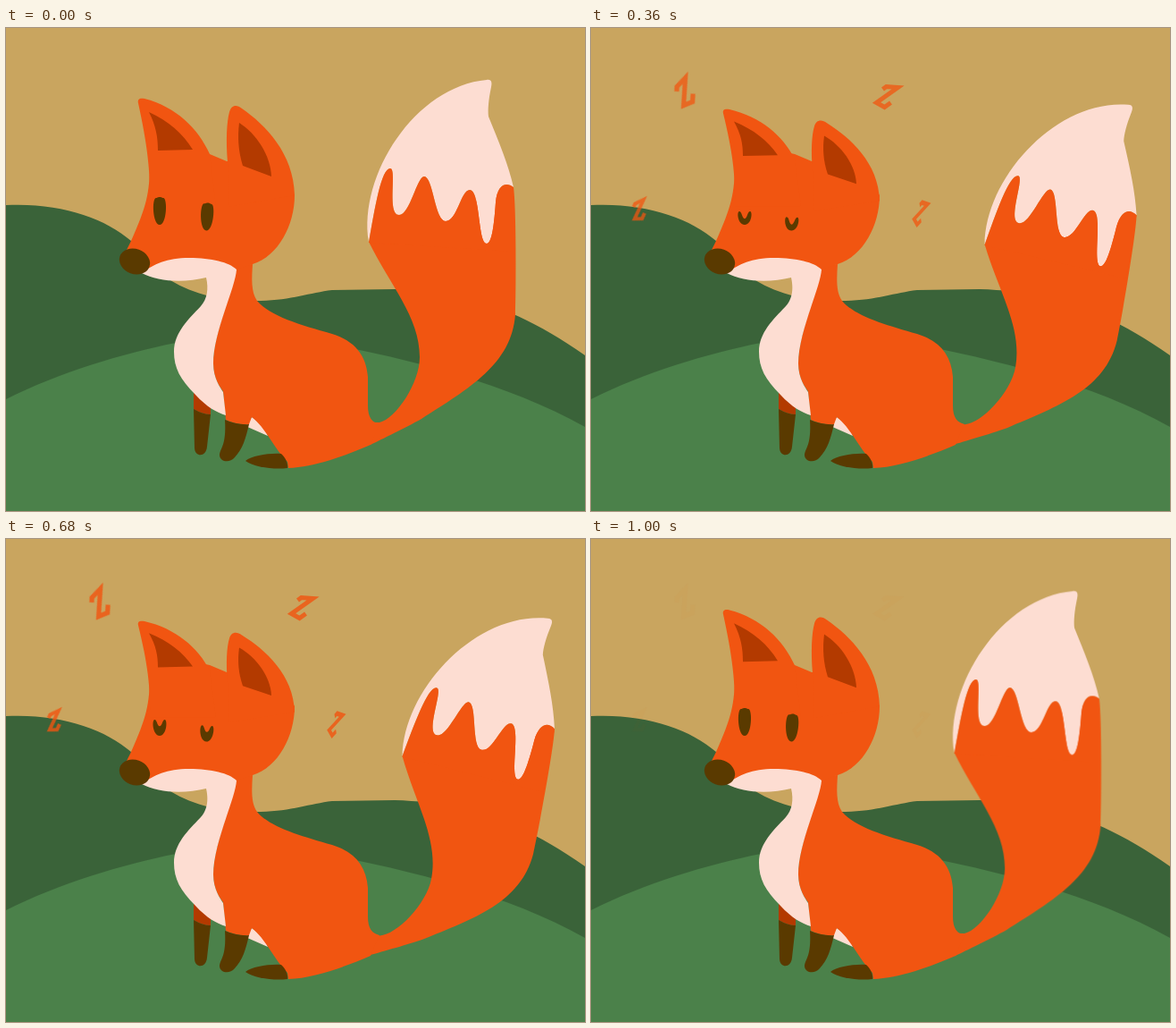
An HTML page for the animation above (1.04 s loop, 648 by 540 pixels).

```html
<!DOCTYPE html>
<html lang="en">
<head>
<meta charset="utf-8">
<title>Sleepy fox</title>
<style>
  html, body { margin: 0; width: 100%; height: 100%; overflow: hidden; background: #c9a55f; }
  svg { display: block; width: 100vw; height: 100vh; }
  .far { fill: #3a6339; }
  .near { fill: #4b814a; }
  .fur { fill: #f15511; }
  .shade { fill: #b33a00; }
  .cream { fill: #fdddd2; }
  .dark { fill: #5a3a00; }
  #zs { fill: none; stroke: #f15511; stroke-width: 5; }
</style>
</head>
<body>
<svg viewBox="0 0 648 540">
  <defs><path id="z" d="M-5 -7L-1 -10L12 -9L-12 8L-3 13L4 8"/></defs>

  <path class="far" d="M0 198C60 195 110 212 140 238C158 268 188 290 228 300C250 304 265 305 285 305C320 304 340 296 365 293L435 292C500 294 565 307 648 366V540H0Z"/>
  <path class="near" d="M0 415C60 385 130 364 190 352C260 338 340 348 405 362C480 378 570 403 648 446V540H0Z"/>

  <g id="zs">
    <use href="#z" transform="translate(105 71.5) rotate(-51) scale(1.05)"/>
    <use href="#z" transform="translate(331.5 75.5)"/>
    <use href="#z" transform="translate(369 206) rotate(10) scale(.5 1.1)"/>
    <use href="#z" transform="translate(54 203) rotate(-30) scale(.8)"/>
  </g>

  <g id="tail">
    <path class="fur" d="M380 440L418 441C436 437 463 397 463 368C463 323 430 288 406 239L568 178C571 200 571 290 570 320C566 376 518 403 465 437C447 447 420 460 408 466L380 460Z"/>
    <path class="cream" d="M406 239C394 165 458 65 538 58C544 57 544 62 543 66C540 80 539 92 540 99C552 128 562 152 568 178C560 172 550 174 548 195C546 225 543 241 538 241C528 241 531 181 519 181C509 181 505 216 492 216C480 216 478 166 468 166C460 166 452 209 440 209C426 209 438 157 430 157C420 157 413 200 406 239Z"/>
    <path class="fur" d="M406 240C413 200 420 157 430 157C438 157 426 209 440 209C452 209 460 166 468 166C478 166 480 216 492 216C505 216 509 181 519 181C531 181 528 241 538 241C543 241 546 225 548 195C550 174 560 172 568 178V250Z"/>
  </g>

  <path class="shade" d="M210 405L229 418V432Q220 432 210 426Z"/>
  <path class="dark" d="M210 426Q220 432 229 432L225 468C224 480 212 480 211 470Z"/>
  <path class="cream" d="M268 445L275 435C283 440 290 448 293 456Z"/>
  <path class="fur" d="M258 266C256 290 232 340 232 375C232 392 240 402 243 406L246 438Q258 444 272 443L275 435C290 446 300 470 315 485L316 492C345 491 380 478 408 466L418 443C410 441 405 436 405 422V390C403 365 390 350 365 342C330 332 295 322 281 305C274 295 275 280 276 264Z"/>
  <path class="dark" d="M245 438Q258 444 272 443C268 460 265 470 256 480C250 487 240 485 239 478C239 470 247 468 245 438Z"/>
  <path class="dark" d="M268 484C275 478 295 475 308 476C313 480 316 488 315 492C300 494 278 491 268 484Z"/>

  <path class="fur" d="M161 150C161 185 157 200 140 238L133 252L152 274L258 270L276 264C305 255 323 220 323 187L300 150L247 149L228 141L200 135Z"/>
  <g id="earL">
    <path class="fur" d="M161 200C162 160 158 130 148 84C147 79 150 78 155 79C190 88 215 112 228 141L235 200Z"/>
    <path class="shade" d="M160 94C168 110 170 122 170 137L209 136C198 118 182 104 160 94Z"/>
  </g>
  <g id="earR">
    <path class="fur" d="M248 150C246 125 247 105 250 94C252 86 258 85 264 90C290 108 322 140 323 187L250 200Z"/>
    <path class="shade" d="M261 106C280 118 296 142 297 166L265 154C260 138 259 122 261 106Z"/>
  </g>
  <path class="cream" d="M152 274C165 264 180 257 205 257C230 257 250 262 258 270C257 290 232 340 232 375C232 392 240 402 243 407L246 433C236 430 225 424 212 410C195 393 188 380 188 362C188 340 205 325 218 311C225 303 227 292 224 279C200 285 170 284 152 274Z"/>
  <ellipse class="dark" cx="144" cy="261" rx="17.5" ry="14" transform="rotate(20 144 261)"/>
  <path id="eyeL" class="dark" transform="translate(172 0)"/>
  <path id="eyeR" class="dark" transform="translate(225 6.5) rotate(3 0 205)"/>
</svg>
<script>
const LOOP = 1040, STEP = 40, PEAK = 560, BLINK = 980, SWING = 13.5;
const $ = id => document.getElementById(id);
const place = (id, value) => $(id).setAttribute('transform', value);

// 0 -> 1 -> 0 as turn goes 0 -> 1 -> 2
const wave = turn => (1 - Math.cos(Math.PI * turn)) / 2;

function squash(id, base, s) {
  place(id, `translate(0 ${base * (1 - s)}) scale(1 ${s})`);
}

// An open oval whose top sinks and notches into a crescent
function eye(shut) {
  const top = 190 + 18 * shut;
  const mid = top - 1 + 10 * Math.sqrt(shut);
  const horn = 4 + 2.5 * shut;
  return `M0 ${mid}C3 ${mid} ${horn / 2} ${top} ${horn} ${top}C9 ${top} 8 220 0 220` +
    `C-8 220 -9 ${top} ${-horn} ${top}C${-horn / 2} ${top} -3 ${mid} 0 ${mid}Z`;
}

function draw(t) {
  // the way back starts a little faster than the way out
  const wag = wave(t < PEAK ? t / PEAK : 1 + ((t - PEAK) / (LOOP - PEAK)) ** .84);
  const doze = wag ** .85;
  const lids = eye(wave(2 * Math.min(1, t / BLINK)));

  place('tail', `rotate(${SWING * wag} 405 445)`);
  squash('earL', 195, 1 - .138 * doze);
  squash('earR', 246, 1 - .138 * doze);
  $('zs').setAttribute('opacity', doze);
  $('eyeL').setAttribute('d', lids);
  $('eyeR').setAttribute('d', lids);
}

const start = performance.now();
function tick(now) {
  const t = Math.max(0, now - start) % LOOP;
  draw(Math.floor(t / STEP) * STEP);
  requestAnimationFrame(tick);
}
draw(0);
requestAnimationFrame(tick);
</script>
</body>
</html>
```
